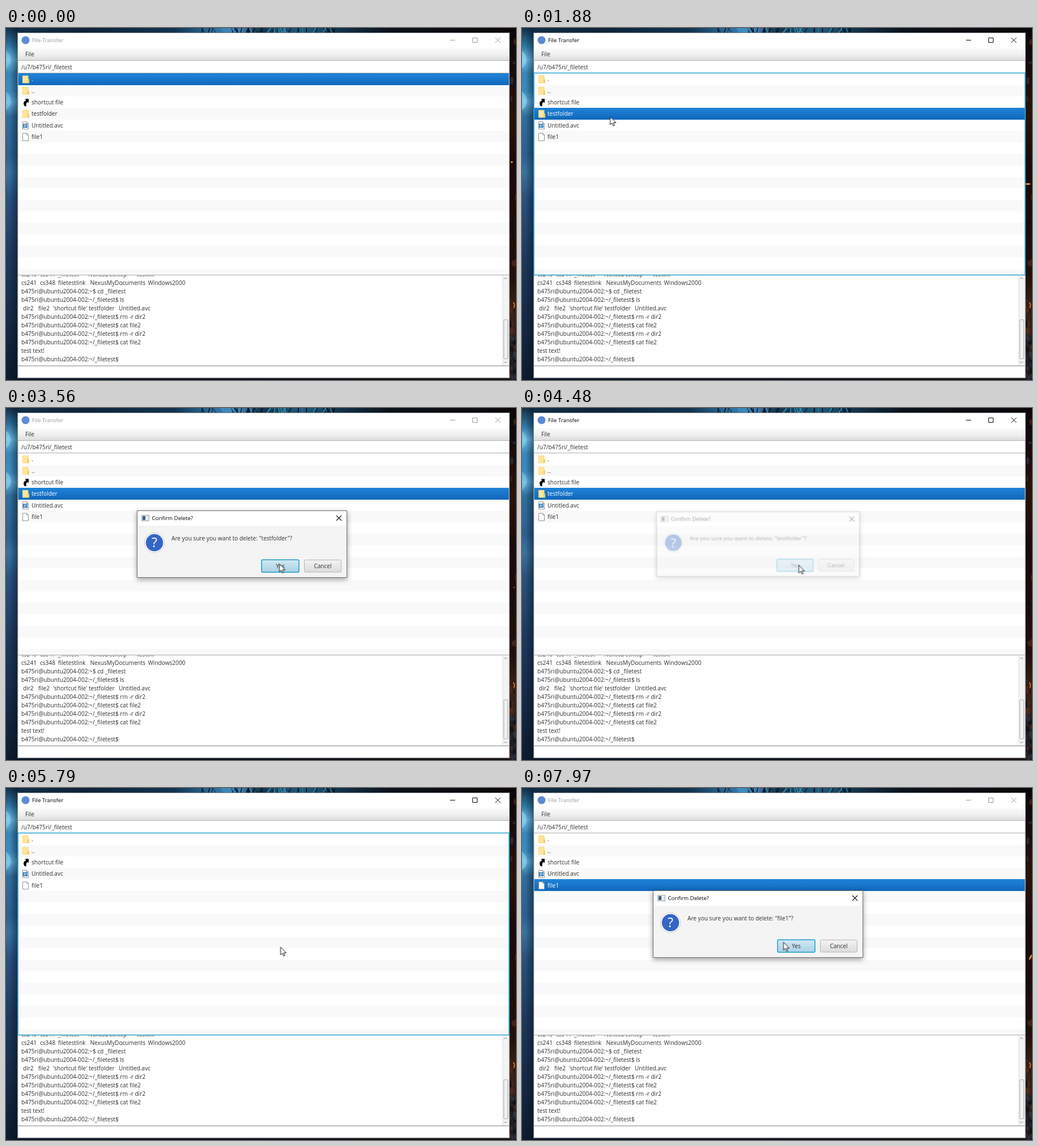
An HTML page for the animation above (8 s loop, 900 px wide and 622 px high).

```html
<!DOCTYPE html>
<html lang="en">
<head>
<meta charset="utf-8">
<title>File Transfer</title>
<style>
html, body { margin: 0; width: 100%; height: 100%; overflow: hidden; background: #0b1522; }
svg { display: block; width: 100vw; height: 100vh; }
text { font: 10.1px "Open Sans", "Noto Sans", sans-serif; fill: #303030; white-space: pre; }
.caption { font-size: 9.7px; }

.step { animation: 8s step-end infinite; }
.move { animation: 8s linear infinite; }

/* 1% of the loop is 80 ms */
#cursor { animation-name: cursor; }
@keyframes cursor {
  0%, 3.4% { transform: translate(838px, 600px); opacity: 0; }
  3.5% { transform: translate(838px, 600px); opacity: 1; }
  6% { transform: translate(720px, 520px); }
  9.5% { transform: translate(262px, 235px); }
  11.3% { transform: translate(206px, 192px); }
  12.5% { transform: translate(182px, 173px); }
  13.6%, 21% { transform: translate(148.5px, 151.5px); }
  25% { transform: translate(160px, 160px); }
  30.5%, 34% { transform: translate(350.5px, 233.5px); }
  45%, 56% { transform: translate(488.5px, 277.5px); }
  59%, 76% { transform: translate(484.5px, 281px); }
  81% { transform: translate(440px, 203px); }
  85%, 91% { transform: translate(434.5px, 170.5px); }
  98%, 100% { transform: translate(461.5px, 272.5px); opacity: 1; }
}

#selection { animation-name: selection; }
@keyframes selection {
  0% { transform: none; opacity: 1; }
  18.75% { transform: translateY(60.9px); opacity: 1; }
  63.75% { opacity: 0; }
  86% { transform: translateY(81.2px); opacity: 1; }
  100% { transform: translateY(81.2px); opacity: 1; }
}
.pick-dot { animation-name: pick-dot; }
@keyframes pick-dot { 0% { fill: #fff; } 18.75%, 100% { fill: #303030; } }
.pick-folder { animation-name: pick-folder; }
@keyframes pick-folder { 0% { fill: #303030; } 18.75%, 100% { fill: #fff; } }
.pick-file { animation-name: pick-file; }
@keyframes pick-file { 0% { fill: #303030; } 86%, 100% { fill: #fff; } }

#removed { animation-name: removed; }
@keyframes removed { 0% { opacity: 1; } 63.75%, 100% { opacity: 0; } }
#below { animation-name: below; }
@keyframes below { 0% { transform: none; } 63.75%, 100% { transform: translateY(-20.3px); } }

#bar { color: #999; animation-name: bar; }
@keyframes bar {
  0%, 25%, 92%, 100% { color: #999; }
  18.75%, 55% { color: #000; }
}
#focus { animation-name: focus; }
@keyframes focus {
  0%, 25%, 92%, 100% { opacity: 0; }
  18.75%, 57% { opacity: 1; }
}

#dialog { transform-origin: 416px 240px; animation-name: dialog; }
@keyframes dialog {
  0%, 25% { opacity: 0; transform: scale(.94); }
  26.8%, 55.1% { opacity: 1; transform: none; }
  56% { opacity: .35; transform: scale(.968); }
  57%, 91.9% { opacity: 0; transform: scale(.94); }
  93.7%, 100% { opacity: 1; transform: none; }
}
#ask-folder { animation-name: ask-folder; }
@keyframes ask-folder { 0% { opacity: 1; } 70%, 100% { opacity: 0; } }
#ask-file { animation-name: ask-file; }
@keyframes ask-file { 0% { opacity: 0; } 70%, 100% { opacity: 1; } }
#hover { animation-name: hover; }
@keyframes hover {
  0%, 60% { opacity: 0; }
  43%, 97.5%, 100% { opacity: 1; }
}

#ember { animation-name: ember; }
@keyframes ember {
  0% { transform: translate(892.5px, 237px) scale(.8); }
  13.9% { transform: translate(896px, 255px) rotate(45deg) scale(2.4, .9); }
  31.5% { transform: translate(890px, 293px) rotate(-40deg) scale(1.5, .7); }
  45% { transform: translate(897px, 318px) scale(.4); }
  60% { transform: translate(902px, 350px) scale(.3); }
  61% { transform: translate(903px, 230px) scale(.3); }
  88% { transform: translate(901px, 270px) scale(.5); }
  100% { transform: translate(897px, 300px) rotate(-65deg) scale(2, .7); }
}
#spark { animation-name: spark; }
@keyframes spark {
  0%, 25%, 38%, 100% { opacity: 0; transform: translate(4px, -8px); }
  31.5% { opacity: .9; transform: none; }
}
#sky { animation: sky 2.4s ease-in-out infinite alternate; }
@keyframes sky { from { opacity: .65; } to { opacity: 1; } }
</style>
</head>
<body>
<svg viewBox="0 0 900 622" preserveAspectRatio="none">
  <defs>
    <linearGradient id="left" x2="0" y2="1">
      <stop offset="0" stop-color="#123049"/><stop offset=".05" stop-color="#2c75a3"/>
      <stop offset=".09" stop-color="#6cbfe6"/><stop offset=".13" stop-color="#3a86b8"/>
      <stop offset=".18" stop-color="#3b8cc0"/><stop offset=".21" stop-color="#62b4de"/>
      <stop offset=".25" stop-color="#306f9f"/><stop offset=".36" stop-color="#2c608f"/>
      <stop offset=".41" stop-color="#3a739f"/><stop offset=".48" stop-color="#2a5280"/>
      <stop offset=".65" stop-color="#1d3a5e"/><stop offset=".8" stop-color="#172c4a"/>
      <stop offset="1" stop-color="#0e1b2e"/>
    </linearGradient>
    <linearGradient id="shade">
      <stop offset=".3" stop-color="#04101c" stop-opacity="0"/><stop offset="1" stop-color="#04101c" stop-opacity=".5"/>
    </linearGradient>
    <linearGradient id="top">
      <stop offset="0" stop-color="#123049"/><stop offset=".15" stop-color="#0d2338"/>
      <stop offset=".33" stop-color="#123450"/><stop offset=".41" stop-color="#2f6f9e"/>
      <stop offset=".46" stop-color="#3b7eae"/><stop offset=".5" stop-color="#12324a"/>
      <stop offset=".58" stop-color="#1f5c7c"/><stop offset=".66" stop-color="#123048"/>
      <stop offset=".75" stop-color="#0b121a"/><stop offset="1" stop-color="#0c0708"/>
    </linearGradient>
    <linearGradient id="right" x2="0" y2="1">
      <stop offset="0" stop-color="#0a0608"/><stop offset=".25" stop-color="#28130b"/>
      <stop offset=".4" stop-color="#180b08"/><stop offset=".7" stop-color="#1e100b"/>
      <stop offset=".8" stop-color="#3b2015"/><stop offset=".88" stop-color="#272022"/>
      <stop offset="1" stop-color="#171a22"/>
    </linearGradient>
    <linearGradient id="base">
      <stop offset="0" stop-color="#0b1626"/><stop offset=".5" stop-color="#0f121a"/><stop offset="1" stop-color="#1a1210"/>
    </linearGradient>
    <linearGradient id="menu" x2="0" y2="1">
      <stop offset="0" stop-color="#fafafa"/><stop offset=".5" stop-color="#f0f0f0"/><stop offset="1" stop-color="#dcdcdc"/>
    </linearGradient>
    <linearGradient id="blue" x2="0" y2="1">
      <stop offset="0" stop-color="#2083d8"/><stop offset="1" stop-color="#1068bd"/>
    </linearGradient>
    <linearGradient id="grey" x2="0" y2="1">
      <stop offset="0" stop-color="#f3f3f3"/><stop offset="1" stop-color="#dcdcdc"/>
    </linearGradient>
    <linearGradient id="yes" x2="0" y2="1">
      <stop offset="0" stop-color="#b4d7e9"/><stop offset="1" stop-color="#8fbdd7"/>
    </linearGradient>
    <linearGradient id="yes-hover" x2="0" y2="1">
      <stop offset="0" stop-color="#d2e8f3"/><stop offset="1" stop-color="#a9d1e5"/>
    </linearGradient>
    <filter id="blur" x="-10%" y="-20%" width="120%" height="150%"><feGaussianBlur stdDeviation="5"/></filter>
    <clipPath id="console"><path d="M21 437.5H876V596H21Z"/></clipPath>

    <g id="folder">
      <path d="M0 0H10.5V5.5L12 7V13.5H0Z" fill="#fbd978"/>
      <path d="M1 1H9V12.5H1Z" fill="#ffe69b"/>
      <path d="M10 7V13" stroke="#e5b84d"/>
    </g>
    <g id="page">
      <path d="M.5 .5H7.5L10.5 3.5V13.5H.5Z" fill="#fff" stroke="#858585" stroke-width=".9"/>
      <path d="M7.5 .5V3.5H10.5" fill="none" stroke="#858585" stroke-width=".8"/>
    </g>
    <g id="media">
      <use href="#page"/>
      <path d="M1 4H9V11H1Z" fill="#2676b8"/>
      <path d="M3 6H5V9H3ZM6 5L8 7 6 9" fill="none" stroke="#d8ecfa"/>
    </g>
    <path id="link" d="M4.5 .5H11V8L9 6Q5.5 8 7 13.5H4Q-1 7 6.5 3Z"/>
  </defs>

  <rect width="900" height="622" fill="url(#base)"/>
  <rect width="900" height="12" fill="url(#top)"/>
  <g id="twigs" fill="none"></g>
  <rect width="21" height="622" fill="url(#left)"/>
  <g id="sky">
    <path d="M378 0H402L398 9H384Z" fill="#4a9ccd" opacity=".6"/>
    <path d="M0 40Q16 55 0 72ZM0 112Q18 130 0 145Z" fill="#9adcf5" opacity=".6"/>
  </g>
  <rect width="21" height="622" fill="url(#shade)"/>
  <rect x="888" width="12" height="622" fill="url(#right)"/>
  <g id="specks"></g>
  <path d="M895 485Q899 488 896 495" stroke="#e57a28" stroke-width="1.6" fill="none"/>
  <path id="spark" class="move" d="M893 6L897 11" stroke="#ffc873" stroke-width="2"/>
  <ellipse id="ember" class="move" rx="2.4" ry="1.8" fill="#ffa950"/>

  <rect x="20.5" y="8.5" width="868" height="610" fill="#fff" stroke="#7f858c"/>
  <circle cx="34.5" cy="21.5" r="7" fill="#5b8ad6"/>
  <g id="bar" class="step">
    <text class="caption" x="46" y="25.2" style="fill:currentColor">File Transfer</text>
    <path d="M783.5 21.5H792.5M823.5 17.5H831.5V25.5H823.5ZM863.5 17L872.5 26M872.5 17L863.5 26" fill="none" stroke="currentColor"/>
  </g>
  <rect x="21" y="36" width="867" height="21.5" fill="url(#menu)"/>
  <text x="34" y="50.2">File</text>
  <path d="M21 57.5H888" stroke="#b5b5b5"/>
  <text x="27" y="72.8">/u7/b475ri/_filetest</text>
  <path d="M21 79.5H888" stroke="#ababab"/>

  <g id="stripes" fill="#f9f9f9"></g>
  <rect id="selection" class="step" x="21" y="80.4" width="867" height="20.3" fill="url(#blue)" shape-rendering="crispEdges"/>
  <g id="list"></g>

  <g id="log" clip-path="url(#console)"></g>
  <path d="M21 436.5H888" stroke="#a9a9a9"/>
  <rect x="876" y="438" width="11.5" height="158" fill="#f3f3f3"/>
  <path d="M876.5 438V596" stroke="#dedede"/>
  <rect x="878.5" y="515.5" width="7" height="69" rx="1.5" fill="#f0f0f0" stroke="#adadad"/>
  <path d="M879 443.5L881.5 441 884 443.5M879 589.5L881.5 592 884 589.5" fill="none" stroke="#777"/>
  <path d="M21 597H888" stroke="#a9a9a9" stroke-width="1.4"/>
  <path d="M21.5 58V618M887.5 58V618M21 617.5H888" stroke="#c4c4c4" stroke-width=".6"/>
  <rect id="focus" class="step" x="21" y="79.5" width="866.7" height="357" fill="none" stroke="#1a9bcb" stroke-width="1.4"/>

  <g id="dialog" class="move">
    <rect x="231" y="184" width="371" height="119" fill="#000" opacity=".4" filter="url(#blur)"/>
    <rect x="231.5" y="181.5" width="370" height="118" fill="#f4f4f4" stroke="#6e6e6e"/>
    <path d="M232 182H601V208H232Z" fill="#fff"/>
    <path d="M239.5 189.5H252.5V199.5H239.5Z" fill="#e6eaf0" stroke="#9aa0a8"/>
    <path d="M241 191H246V198H241Z" fill="#3d5f7d"/>
    <text class="caption" x="257.5" y="198.2" style="fill:#000">Confirm Delete?</text>
    <path d="M583 190L592 199M592 190L583 199" stroke="#111" stroke-width="1.1"/>
    <circle cx="262" cy="238" r="17.5" fill="#fff" stroke="#c6c9ce"/>
    <circle cx="262" cy="238" r="15.3" fill="#3566c4"/>
    <text x="262" y="246.3" text-anchor="middle" style="font-size:23px;fill:#fff">?</text>
    <text id="ask-folder" class="step" x="292" y="233.8">Are you sure you want to delete: "testfolder"?</text>
    <text id="ask-file" class="step" x="292" y="233.8">Are you sure you want to delete: "file1"?</text>
    <rect x="451" y="268.2" width="66" height="22" rx="2" fill="url(#yes)"/>
    <rect id="hover" class="step" x="451" y="268.2" width="66" height="22" rx="2" fill="url(#yes-hover)"/>
    <rect x="451" y="268.2" width="66" height="22" rx="2" fill="none" stroke="#1b9ccb" stroke-width="1.5"/>
    <text x="484" y="283" text-anchor="middle">Yes</text>
    <rect x="526.5" y="268.5" width="65" height="21.5" rx="2" fill="url(#grey)" stroke="#b3b3b3"/>
    <text x="559" y="283" text-anchor="middle">Cancel</text>
  </g>

  <path id="cursor" class="move" d="M0 0V14L3.3 11 5.5 16 7.7 15 5.6 10.3H10Z" fill="#fff" stroke="#111"/>
</svg>
<script>
const ROW = 20.3, TOP = 80.4;
const put = (id, html) => document.getElementById(id).innerHTML = html;
const range = (n, make) => Array.from({ length: n }, (_, i) => make(i)).join("");

let seed = 7;
const random = () => (seed = seed * 16807 % 2147483647) / 2147483647;

put("stripes", range(9, i => {
  const y = TOP + ROW * (2 * i + 1);
  return `<rect x="21" y="${y}" width="867" height="${Math.min(ROW, 436 - y)}"/>`;
}));

const item = (row, icon, name, pick = "") => {
  const middle = TOP + ROW * (row + .5);
  return `<use href="#${icon}" x="29" y="${middle - 6.5}"/>
    <text class="step ${pick}" x="45" y="${middle + 3.8}">${name}</text>`;
};
put("list",
  item(0, "folder", ".", "pick-dot") + item(1, "folder", "..") + item(2, "link", "shortcut file") +
  `<g id="removed" class="step">${item(3, "folder", "testfolder", "pick-folder")}</g>
   <g id="below" class="step">${item(4, "media", "Untitled.avc")}${item(5, "page", "file1", "pick-file")}</g>`);

const host = "b475ri@ubuntu2004-002:~";
const prompt = host + "/_filetest$ ";
const columns = (names, xs) => names.map((name, i) => [xs[i], name]);
const log = [
  columns(["cs240", "cs341", "_filetest", "NexusDesktop", "testtxt"], [27, 60, 92, 145, 231]),
  columns(["cs241", "cs348", "filetestlink", "NexusMyDocuments", "Windows2000"], [27, 60, 92, 148.5, 250.5]),
  host + "$ cd _filetest",
  prompt + "ls",
  columns(["dir2", "file2", "'shortcut file'", "testfolder", "Untitled.avc"], [30, 57, 83, 146, 199]),
  prompt + "rm -r dir2",
  prompt + "cat file2",
  prompt + "rm -r dir2",
  prompt + "cat file2",
  "test text!",
  prompt
];
put("log", log.map((line, i) =>
  (Array.isArray(line) ? line : [[27, line]])
    .map(([x, words]) => `<text x="${x}" y="${439.4 + 15 * i}">${words}</text>`).join("")
).join(""));

put("twigs", range(40, i => {
  const x = 345 + random() * 250;
  const color = i % 2 && x > 430 ? "#3585a8" : "#081420";
  return `<path d="M${x} 0l${random() * 14 - 7} 9" stroke="${color}" stroke-width="${.6 + random() * 1.8}"/>`;
}));
put("specks", range(46, i => {
  const y = i < 12 ? random() * 470 : 470 + random() * 150;
  const color = ["#5a2d18", "#0a0a10", "#343844"][i % 3];
  return `<ellipse cx="${889.5 + random() * 10.5}" cy="${y}" rx="${1 + random() * 2}" ry="${2 + random() * 5}" fill="${color}" opacity=".6"/>`;
}));
</script>
</body>
</html>
```
